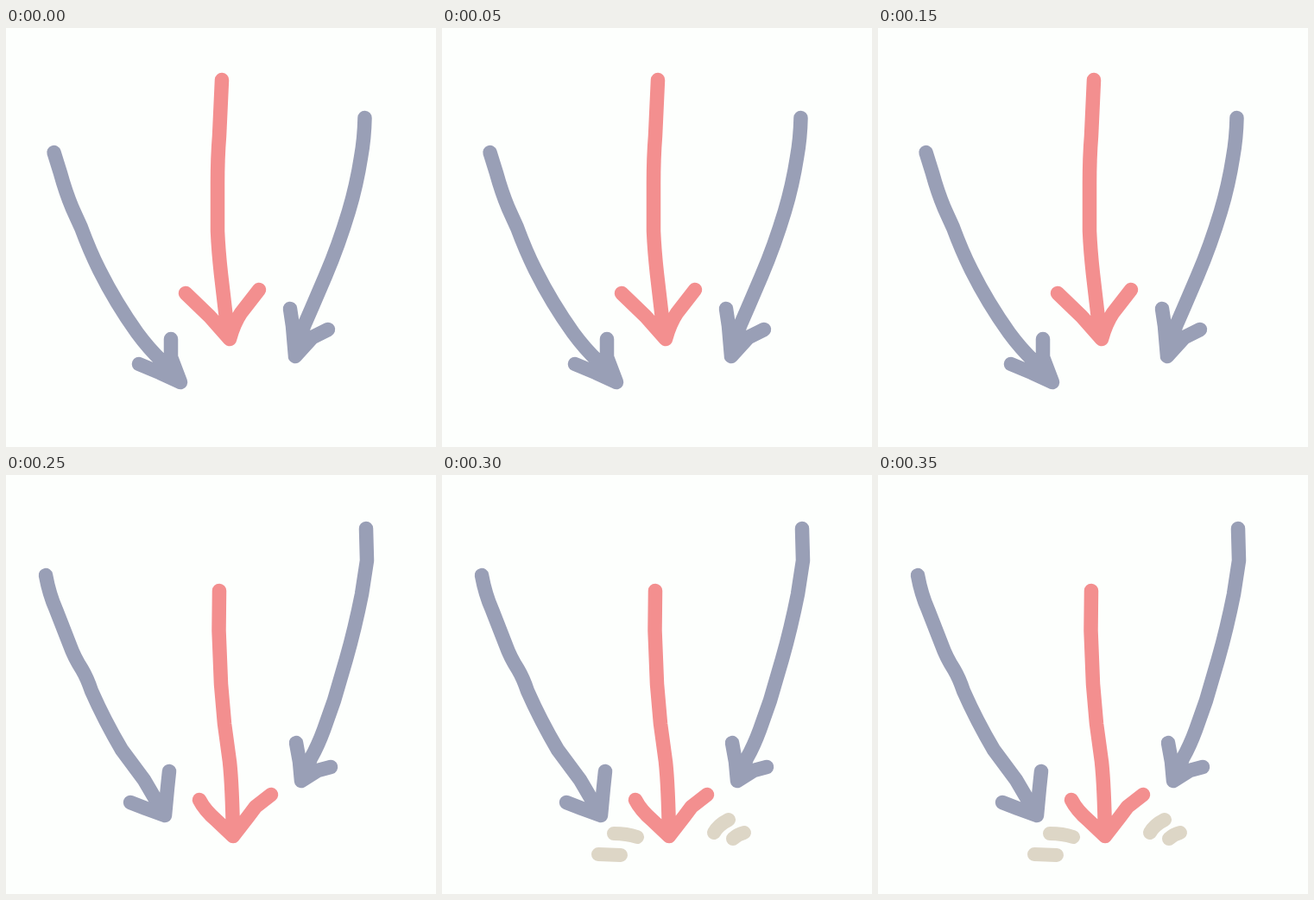
An HTML page that plays this animation: 498 px wide and 485 px high, repeating every 450 ms.

```html
<!DOCTYPE html>
<html lang="en">
<head>
<meta charset="utf-8">
<title>Arrows</title>
<style>
  html, body { margin: 0; width: 100%; height: 100%; overflow: hidden; background: #fdfffd; }
  svg { display: block; width: 498px; height: 485px; }
  path { fill: none; stroke-width: 16.5; stroke-linecap: round; stroke-linejoin: round; }
  .grey { stroke: #999fb6; }
  .red { stroke: #f38f8f; }
  .dash { stroke: #ddd6c6; stroke-width: 16; }
  .raised, .landed, .impact { animation: 450ms step-end infinite; }
  .raised { animation-name: raised; }
  .landed { animation-name: landed; }
  .impact { animation-name: impact; }
  @keyframes raised { 0% { visibility: visible; } 44.444%, 100% { visibility: hidden; } }
  @keyframes landed { 0% { visibility: hidden; } 44.444%, 100% { visibility: visible; } }
  @keyframes impact { 0% { visibility: hidden; } 66.666%, 100% { visibility: visible; } }
</style>
</head>
<body>
<svg viewBox="0 0 498 485">
  <g class="raised">
    <path class="grey" d="M55.500 144L63 168Q69 190 77 209L87 231Q97 258 108 280Q127 318 152 353Q166 372 181 386L202 410
      M154 389L178 399L202 410M191 360L191 381L202 410L184 392"/>
    <path class="red" d="M250 60L247 125Q245 150 245 180V235Q246 258 249 285Q253 320 256 345L259 360
      M208 307L236 334L259 360M293 303L272 330Q264 342 259 360"/>
    <path class="grey" d="M415.500 104Q415 128 411 150Q406 182 397 212Q385 252 370 287L355 322L345 345L335 380
      M329 325L332 345L335 380M373 349L355 358L335 380L340 355"/>
  </g>
  <g class="landed">
    <path class="grey" d="M46 116Q50 138 58 156L74 197Q79 211 88 225Q94 235 99 250Q114 284 134 318L160 353L184 394
      M144 379L162 386L184 394M189 343L187 362L184 394"/>
    <path class="red" d="M247 134L246.500 180L249 242L253 288L259 332Q262 360 263 418
      M224 376Q230 388 244 400L263 418M307 370L289 384L280 396L263 418"/>
    <path class="grey" d="M417 62L418 99L412 138Q404 178 394 213L380 261L368 295Q361 314 353 328L342 354
      M336 310L340 332L342 354M376 338L361 342L342 354"/>
  </g>
  <g class="impact">
    <path class="dash" d="M199 415Q214 415 226 419M181 439L207 440M332 399Q320 405 315 414M350 414Q342 416 337 421"/>
  </g>
</svg>
</body>
</html>
```
